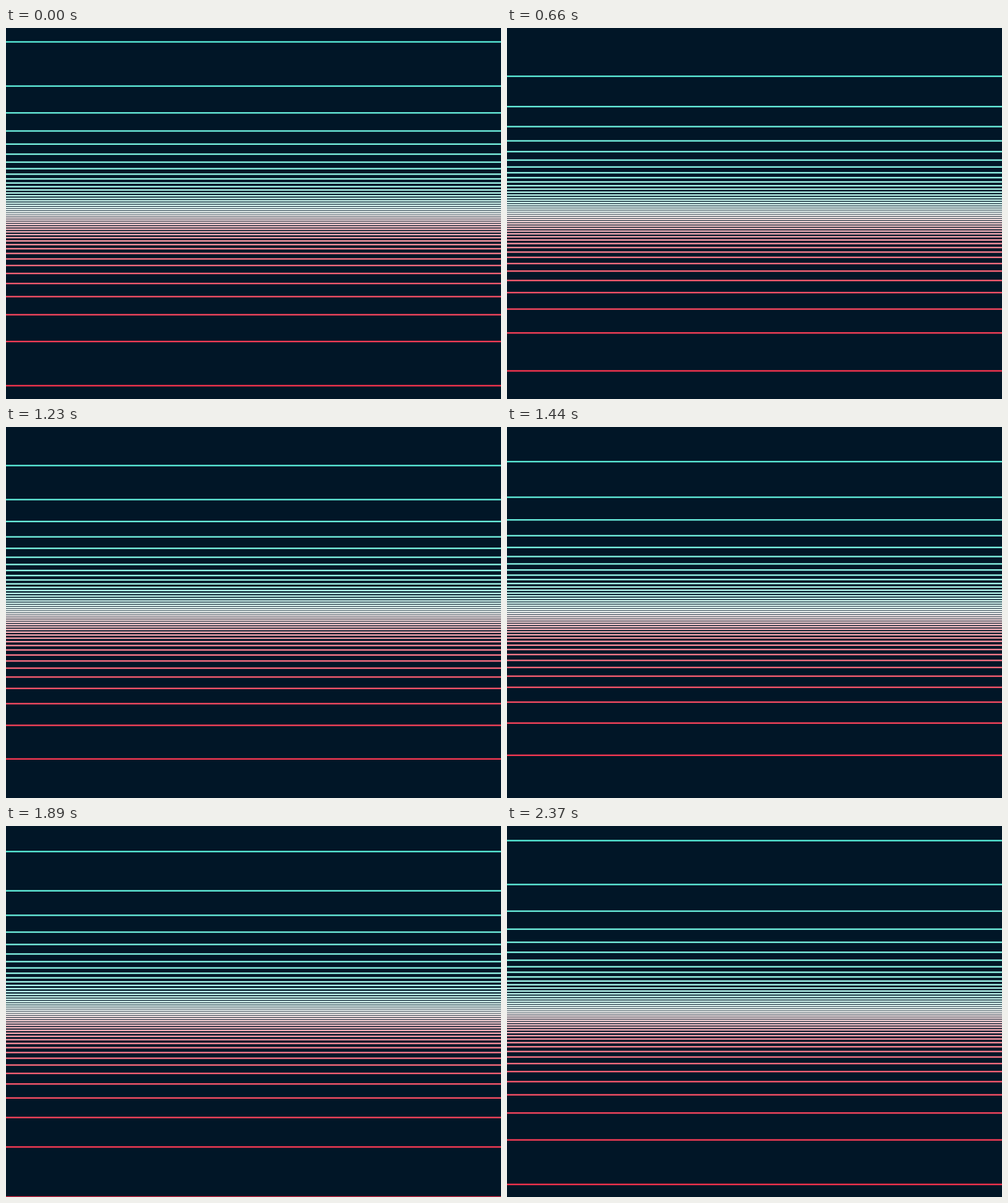
Write an HTML page with a canvas that moves like this. It is 800 px wide and 600 px high and loops after 2400 ms.

```html
<!DOCTYPE html>
<html>
<head>
<meta charset="utf-8">
<style>
  html, body { margin: 0; height: 100%; overflow: hidden; background: #011627; }
  canvas { display: block; }
</style>
</head>
<body>
<canvas id="stage" width="800" height="600"></canvas>
<script>
const ctx = document.getElementById('stage').getContext('2d');
const LOOP = 2400, LINES = 50, SCALE = 53.03, HORIZON = 300.5, WEIGHT = 2.4;
const TEAL = [65, 234, 212], WHITE = [253, 255, 252], RED = [247, 23, 53];

const mix = (a, b, t) => `rgb(${a.map((v, i) => Math.round(v + (b[i] - v) * t))})`;

// u runs from 0 (top) to 1 (bottom)
const colorAt = u => u < 0.5 ? mix(TEAL, WHITE, u * 2) : mix(WHITE, RED, u * 2 - 1);

// Lines at equal angles, projected from the centre of a circle onto the screen
function draw(now) {
  const phase = (now % LOOP) / LOOP;
  ctx.fillStyle = '#011627';
  ctx.fillRect(0, 0, 800, 600);
  for (let i = 1; i <= LINES; i++) {
    const u = (i - phase) / LINES;
    const y = HORIZON + SCALE * Math.tan((u - 0.5) * Math.PI);
    if (y < -WEIGHT || y > 600 + WEIGHT) continue;
    ctx.fillStyle = colorAt(u);
    ctx.fillRect(0, y - WEIGHT / 2, 800, WEIGHT);
  }
}

function tick() {
  draw(performance.now());
  requestAnimationFrame(tick);
}
tick();
</script>
</body>
</html>
```
